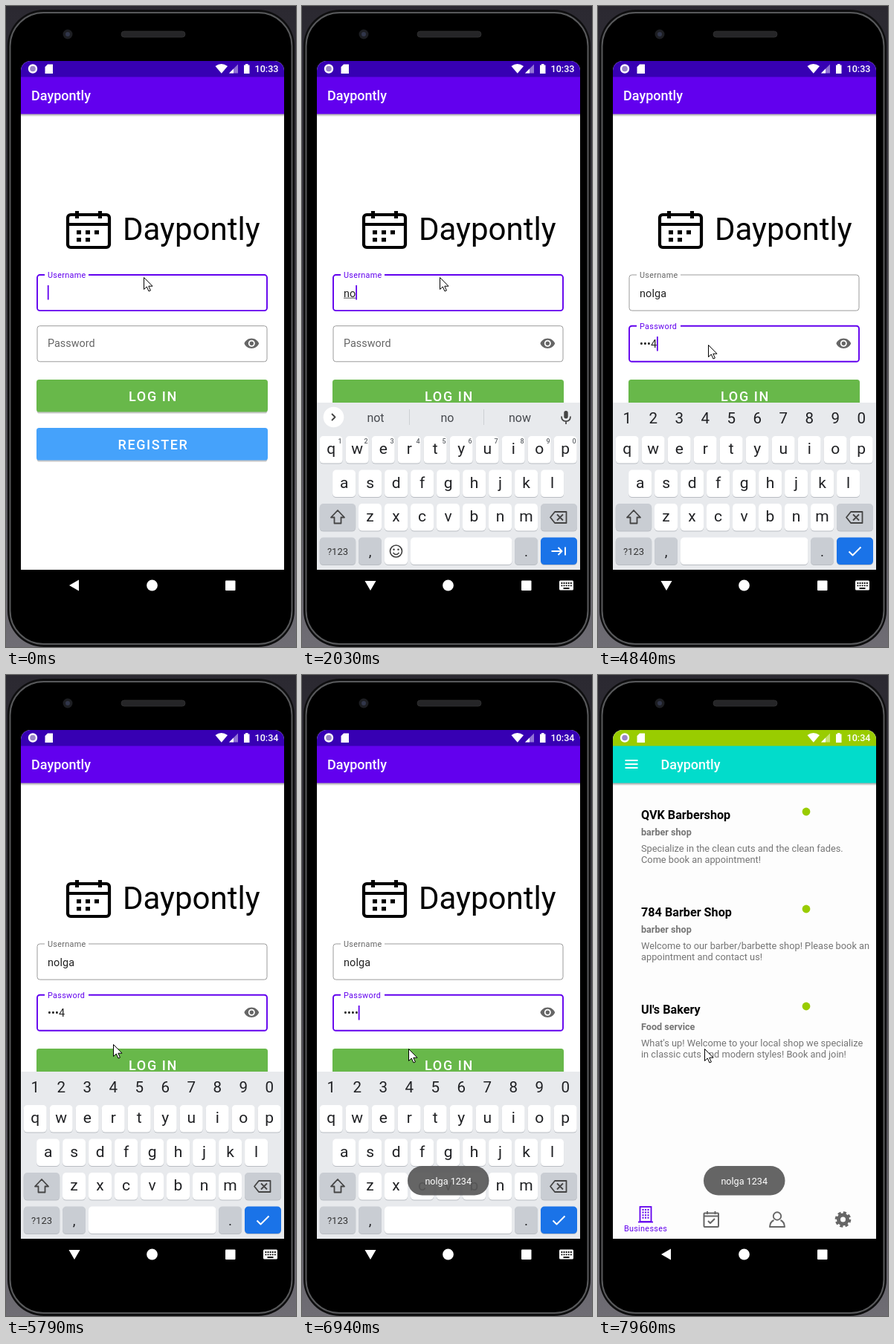
An HTML page that plays this animation: 390 px wide and 863 px high, repeating every 8 s.

```html
<!DOCTYPE html>
<html lang="en">
<head>
<meta charset="utf-8">
<title>Sign in</title>
<style>
  html, body { margin: 0; width: 100%; height: 100%; overflow: hidden; background: #1c1b20; }
  svg { display: block; width: 100%; height: 100%; }
  text { font-family: Roboto, "Open Sans", sans-serif; white-space: pre; }
  .mid { text-anchor: middle; }
  .medium { font-weight: 500; }
  .bold { font-weight: 700; }
  .button { font-weight: 500; letter-spacing: 1.6px; text-anchor: middle; }
  .label { letter-spacing: .32px; }
  .input { letter-spacing: .13px; }
  .line { fill: none; stroke-linejoin: round; }
</style>
</head>
<body>
<svg id="stage" viewBox="0 0 390 863"></svg>
<script>
const LOOP = 8000;
const APP = 'Daypontly';
const USER = 'nolga';
const PURPLE = '#6200ee', GREY = '#666', KEY_INK = '#202124';

const rect = (x, y, w, h, r, fill, extra = '') =>
  `<rect x="${x}" y="${y}" width="${w}" height="${h}" rx="${r}" fill="${fill}" ${extra}/>`;
const circle = (x, y, r, fill, extra = '') =>
  `<circle cx="${x}" cy="${y}" r="${r}" fill="${fill}" ${extra}/>`;
const text = (x, y, str, size, fill, extra = '') =>
  `<text x="${x}" y="${y}" font-size="${size}" fill="${fill}" ${extra}>${str}</text>`;
const line = (d, stroke, width = 1.8, extra = '') =>
  `<path class="line" d="${d}" stroke="${stroke}" stroke-width="${width}" ${extra}/>`;
const shape = (d, fill, extra = '') => `<path d="${d}" fill="${fill}" ${extra}/>`;
const group = (id, body, extra = '') => `<g id="${id}" ${extra}>${body}</g>`;
const mid = 'class="mid"';

const defs = `<defs>
  <linearGradient id="desk" x2="0" y2="1"><stop stop-color="#2b2931"/><stop offset=".4" stop-color="#3a383f"/><stop offset="1" stop-color="#6f6d74"/></linearGradient>
  <linearGradient id="fade" x2="0" y2="1"><stop stop-opacity=".36"/><stop offset="1" stop-opacity="0"/></linearGradient>
  <clipPath id="screen"><path d="M20 759V87a13 13 0 0 1 13-13H361a13 13 0 0 1 13 13V759z"/></clipPath>
  <clipPath id="loginArea">${rect(41, 503, 311, 44, 3.6, '#000')}</clipPath>
</defs>`;

const phone = () =>
  rect(0, 0, 390, 863, 0, 'url(#desk)') +
  rect(2, 5, 386, 858, 49, '#0e0e0f') +
  rect(5.5, 9, 379, 850, 45, '#000', 'stroke="#58595b" stroke-width="2"') +
  circle(83, 38, 6.5, '#1d1e22') + circle(83, 38, 3, '#31364a') +
  rect(155, 34, 86, 8, 4, '#252527', 'stroke="#333" stroke-width=".8"');

const appBar = color => rect(20, 95.5, 354, 50, 0, color) + rect(20, 145.5, 354, 3.5, 0, 'url(#fade)');

const calendarLogo = () =>
  rect(83, 281, 56, 44, 4, 'none', 'stroke="#000" stroke-width="4.2"') +
  line('M83 294H139', '#000', 4) +
  rect(93, 276, 5, 10, 0, '#000') + rect(124, 276, 5, 10, 0, '#000') +
  [[95, 302], [107, 302], [119, 302], [95, 312], [107, 312]]
    .map(([x, y]) => rect(x, y, 6, 5.4, 0, '#000')).join('');

const button = (y, color, label) =>
  rect(41.5, y + 1.5, 310, 44, 3.6, '#000', 'opacity=".22"') +
  rect(41, y, 311, 43.5, 3.6, color) + label;
const buttonLabel = (y, str) => text(198, y + 28.6, str, 18, '#fff', 'class="button"');

const field = (id, y) => rect(42, y, 309, 48.1, 3.6, '#fff', `id="${id}"`);

const loginPage = () =>
  rect(20, 74, 354, 685, 0, '#fff') +
  rect(20, 74, 354, 22, 0, '#3700b3') + appBar(PURPLE) +
  text(34, 127.3, APP, 18, '#fff', 'class="medium"') +
  calendarLogo() + text(157, 315, APP, 42, '#000') +
  field('userBox', 362) + rect(52, 358, 59, 8, 0, '#fff') +
  text(56, 366, 'Username', 10.8, PURPLE, 'id="userLabel" class="label"') +
  text(56, 391.8, '', 14.4, '#222', 'id="userText" class="input"') +
  rect(56, 392.7, 0, 1, 0, '#555', 'id="underline"') +
  field('passBox', 430.7) + rect(52, 427, 59, 8, 0, '#fff', 'id="passNotch"') +
  text(56, 459.3, 'Password', 14.4, GREY, 'id="passLabel"') +
  text(56, 460, '', 14.4, '#222', 'id="passText" class="input"') +
  rect(56, 376, 1.8, 19.5, 0, PURPLE, 'id="caret"') +
  shape('M12 4.5C7 4.5 2.7 7.6 1 12c1.7 4.4 6 7.5 11 7.5s9.3-3.1 11-7.5c-1.7-4.4-6-7.5-11-7.5zM12 17a5 5 0 1 1 0-10a5 5 0 0 1 0 10zm0-8a3 3 0 1 0 0 6a3 3 0 0 0 0-6z',
    GREY, 'transform="translate(319.5 443.5) scale(.9)"') +
  button(503, '#68b84a',
    group('press', rect(41, 503, 311, 44, 0, '#fff', 'opacity=".22"') +
      circle(157, 526, 60, '#fff', 'id="ripple" opacity=".16"'), 'clip-path="url(#loginArea)"') +
    buttonLabel(503, 'LOG IN')) +
  button(568, '#45a2fb', buttonLabel(568, 'REGISTER'));

const shops = [
  ['QVK Barbershop', 'barber shop', 'Specialize in the clean cuts and the clean fades.', 'Come book an appointment!'],
  ['784 Barber Shop', 'barber shop', 'Welcome to our barber/barbette shop! Please book an', 'appointment and contact us!'],
  ["Ul's Bakery", 'Food service', "What's up! Welcome to your local shop we specialize", 'in classic cuts and modern styles! Book and join!']
];
const shopItem = ([name, kind, ...about], i) => {
  const y = 131 * i;
  return text(58, y + 194, name, 16.2, '#000', 'class="bold"') +
    text(58, y + 216, kind, 12.6, '#757575', 'class="bold"') +
    about.map((s, k) => text(58, y + 238.2 + 15 * k, s, 12.8, '#757575')).join('') +
    circle(280, y + 184, 5.4, '#9c0');
};

const bottomTabs = () =>
  rect(56.5, 716, 15, 20, 0, 'none', `stroke="${PURPLE}" stroke-width="1.8"`) +
  line('M60.5 719V732M64 719V732M67.5 719V732', PURPLE, 2, 'stroke-dasharray="2 1.6"') +
  line('M54 736.5H74', PURPLE, 1.8) +
  text(64, 749, 'Businesses', 10.8, PURPLE, 'class="mid label"') +
  rect(142.5, 724.5, 19.5, 18.5, 1, 'none', `stroke="${GREY}" stroke-width="2"`) +
  line('M142 728.5H162M147 722V726M157.5 722V726M148 735l3 3 6-6', GREY, 2) +
  circle(241, 728.5, 5.2, 'none', `stroke="${GREY}" stroke-width="1.9"`) +
  line('M236.5 734q-5 2-5.5 9h20q-.5-7-5.5-9', GREY, 1.9) +
  circle(329.5, 733, 6, 'none', `stroke="${GREY}" stroke-width="5"`) +
  circle(329.5, 733, 9, 'none', `stroke="${GREY}" stroke-width="3.6" stroke-dasharray="4 3.07"`);

const homePage = () =>
  rect(20, 74, 354, 685, 0, '#fdfdfd') +
  rect(20, 74, 354, 22, 0, '#9c0') + appBar('#02dccb') +
  line('M36.5 115H53.5M36.5 120H53.5M36.5 125H53.5', '#fff') +
  text(84.5, 127.3, APP, 18, '#fff', 'class="medium"') +
  group('shops', shops.map(shopItem).join('')) + bottomTabs();

const statusIcons = () =>
  circle(36, 84.5, 5, '#9a86c8', 'stroke="#fff" stroke-width="2.4"') +
  shape('M56 78.5h7v12.5h-10.5v-9z', '#fff') +
  shape('M281.5 81q8-6 16.5 0l-8.2 9.8z', '#fff') +
  shape('M312 78.5V90.5H300z', '#fff', 'opacity=".45"') + shape('M306 84.5V90.5H300z', '#fff') +
  shape('M320 79.5h2v-1.5h3.5v1.5h2V91H320z', '#fff') +
  text(334.5, 89, '10:33', 12.6, '#fff', 'id="clock" class="medium"');

const key = (x, y, w, fill = '#fff') =>
  rect(x, y + 1, w, 36.6, 5, '#b9bdc3') + rect(x, y, w, 36.6, 5, fill);
const keyRow = (letters, first, y) => [...letters].map((c, i) =>
  key(first + 35 * i - 15.5, y, 31) + text(first + 35 * i, y + 24, c, 21, KEY_INK, mid)).join('');

const keyboard = () => {
  const dark = '#c9cdd3', ink = '#444';
  const digits = [...'1234567890'];
  const common = rect(20, 534, 354, 226, 0, '#e8eaed') +
    keyRow('qwertyuiop', 39.2, 579) + keyRow('asdfghjkl', 56.6, 624.5) + keyRow('zxcvbnm', 91.5, 670) +
    key(23.7, 670, 48.5, dark) + key(321, 670, 49, dark) +
    line('M48 679l9 9.5h-4.5v8h-9v-8h-4.5z', ink) +
    line('M334 688.5l6-7.5h15.5v15h-15.5zM343 684.5l8 8m0-8l-8 8', ink) +
    key(23.7, 715.5, 48.5, dark) + text(48, 739, '?123', 13, '#333', mid) +
    key(76, 715.5, 31, dark) + text(91.5, 741, ',', 19, KEY_INK, mid) +
    key(286, 715.5, 31, dark) + text(301.5, 741, '.', 19, KEY_INK, mid) +
    key(321, 715.5, 49, '#1a73e8');
  const hints = digits.map((d, i) => text(51 + 35 * i, 589, d, 9, '#5f6368', 'class="mid medium"')).join('');
  const words = [99, 195.5, 293].map((x, i) => text(x, 559.6, '', 16, '#474a4f', `id="word${i}" class="mid"`)).join('');
  const wordKeys = hints + words +
    circle(42.5, 553.5, 13.8, '#fff') + line('M40 549l4.5 4.5-4.5 4.5', ink) +
    line('M144.5 543V564M244.5 543V564', '#cdd0d4', 1) +
    rect(352.3, 545, 5.4, 10.5, 2.7, ink) + line('M349 552.5q0 6.5 6 6.5t6-6.5M355 559v4', ink, 1.7) +
    key(111, 715.5, 31) + circle(126.5, 734, 8, 'none', `stroke="${ink}" stroke-width="1.7"`) +
    line('M122.5 736q4 5 8 0', ink, 1.6) + circle(123.5, 731.7, 1.3, ink) + circle(129.5, 731.7, 1.3, ink) +
    key(146, 715.5, 136.5) + line('M335.5 734H349M344.5 729l5 5-5 5M354 728.5V739.5', '#fff', 1.9);
  const passKeys = digits.map((d, i) => text(39.2 + 35 * i, 561.8, d, 20.5, KEY_INK, mid)).join('') +
    key(111, 715.5, 171.5) + line('M337.5 734.5l5 5 11-11', '#fff', 2);
  return common + group('wordKeys', wordKeys) + group('passKeys', passKeys);
};

const navBar = () =>
  shape('M85 780L98 772.5V787.5z', '#fff', 'id="back"') +
  circle(196.5, 780, 7.4, '#fff') + rect(295, 773.5, 13.5, 13.5, 1, '#fff') +
  group('imeIcon', rect(346, 773.5, 19, 13, 1.5, '#fff') +
    line('M348.5 777H363M348.5 780.3H363', '#000', 1.8, 'stroke-dasharray="1.8 1.3"') +
    line('M351.5 784H359.5', '#000', 1.8));

const toast = () => rect(142, 661, 109.5, 39.5, 19.7, '#5a5a5a', 'opacity=".93"') +
  text(196.7, 686, USER + ' 1234', 12.6, '#fff', mid);

const stage = document.getElementById('stage');
stage.innerHTML = defs + phone() +
  `<g clip-path="url(#screen)">${loginPage()}${group('home', homePage())}${statusIcons()}${group('keys', keyboard())}</g>` +
  navBar() + group('toast', toast()) +
  group('mouse', shape('M.5 .5V16.5L4.3 13L7 19L9.4 18L6.8 12.2H12z', '#fff', 'stroke="#000" stroke-width="1"'));

const el = {};
stage.querySelectorAll('[id]').forEach(n => el[n.id] = n);

// Held values: [start time, value], latest start wins.
const track = (...steps) => t => steps.reduce((v, [at, value]) => t >= at ? value : v, steps[0][1]);

const typedCount = track([0, 0], [1550, 1], [1670, 2], [2400, 3], [2520, 4], [2760, 5]);
const composed = track([0, 0], [2030, 16], [2520, 22], [3010, 36]);
const words = track([0, ['not', 'no', 'now']], [2520, ['nol', 'no', 'nolo']], [2760, ['nolg', 'nol', 'Nolg']],
  [3010, [USER, USER + 'gfs', 'Nolga']]);
const password = track([0, ''], [4190, '1'], [4440, '•2'], [4590, '••3'], [4840, '•••4'], [6310, '••••']);
const caretOn = track([0, 1], [250, 0], [770, 1], [1300, 0], [1550, 1], [3530, 0], [3930, 1],
  [5370, 0], [5910, 1], [6310, 0], [6820, 1], [7340, 0]);
const keysOffset = track([0, 240], [1790, 120], [1910, 35], [2030, 0], [7720, 1], [7840, 90], [7960, 240]);
const labelStage = track([0, 0], [3930, 1], [4050, 2]);
const pressAlpha = track([0, 0], [6550, 1], [6670, 1], [6820, .4], [6940, 0]);
const rippleSize = track([0, 60], [6670, 130], [6820, 190]);
const toastAlpha = track([0, 0], [6670, .35], [6820, .8], [6940, 1]);
const homeState = track([0, [0, 0]], [7720, [14, .9]], [7840, [3, 1]], [7960, [0, 1]]);
const mouseAt = track([0, [185, 365]], [3400, [170, 413]], [3530, [159, 438]], [3650, [151, 452]], [3780, [148, 456]],
  [5370, [148, 460]], [5520, [147, 480]], [5670, [146, 490]], [5790, [144, 497]], [5910, [143, 500]], [6060, [143, 503]]);

const set = (node, attrs) => { for (const k in attrs) node.setAttribute(k, attrs[k]); };
const show = (node, on) => set(node, { display: on ? 'inline' : 'none' });
const put = (node, str) => { if (node.textContent !== str) node.textContent = str; };
const outline = (node, focused) => set(node, {
  stroke: focused ? PURPLE : '#9b9b9b', 'stroke-width': focused ? 1.9 : 1 });

function render(t) {
  const phase = labelStage(t), onPass = phase > 0;
  outline(el.userBox, !onPass);
  outline(el.passBox, onPass);
  set(el.userLabel, { fill: onPass ? GREY : PURPLE });
  set(el.passLabel, { y: [459.3, 446, 434.6][phase], 'font-size': [14.4, 12.6, 10.8][phase],
    fill: onPass ? PURPLE : GREY, class: phase === 2 ? 'label' : '' });
  show(el.passNotch, onPass);

  put(el.userText, USER.slice(0, typedCount(t)));
  put(el.passText, password(t));
  set(el.underline, { width: onPass ? 0 : composed(t) });
  const active = onPass ? el.passText : el.userText;
  const width = active.textContent ? active.getComputedTextLength() : 0;
  set(el.caret, { x: 55.8 + width, y: onPass ? 445 : 376 });
  show(el.caret, caretOn(t));

  words(t).forEach((w, i) => put(el['word' + i], w));
  show(el.wordKeys, phase < 2);
  show(el.passKeys, phase === 2);
  set(el.keys, { transform: `translate(0 ${keysOffset(t)})` });

  set(el.press, { opacity: pressAlpha(t) });
  set(el.ripple, { r: rippleSize(t) });
  set(el.toast, { opacity: toastAlpha(t) });

  const [drop, alpha] = homeState(t);
  set(el.home, { transform: `translate(0 ${drop})`, opacity: alpha });
  show(el.home, alpha);
  show(el.shops, t >= 7960);

  const imeOpen = t >= 1670 && t < 7720;
  set(el.back, { transform: imeOpen ? 'rotate(-90 92 780)' : '' });
  show(el.imeIcon, imeOpen);
  put(el.clock, t < 5520 ? '10:33' : '10:34');
  set(el.mouse, { transform: `translate(${mouseAt(t)})` });
}

const start = performance.now();
function tick() {
  render((performance.now() - start) % LOOP);
  requestAnimationFrame(tick);
}
tick();
</script>
</body>
</html>
```
